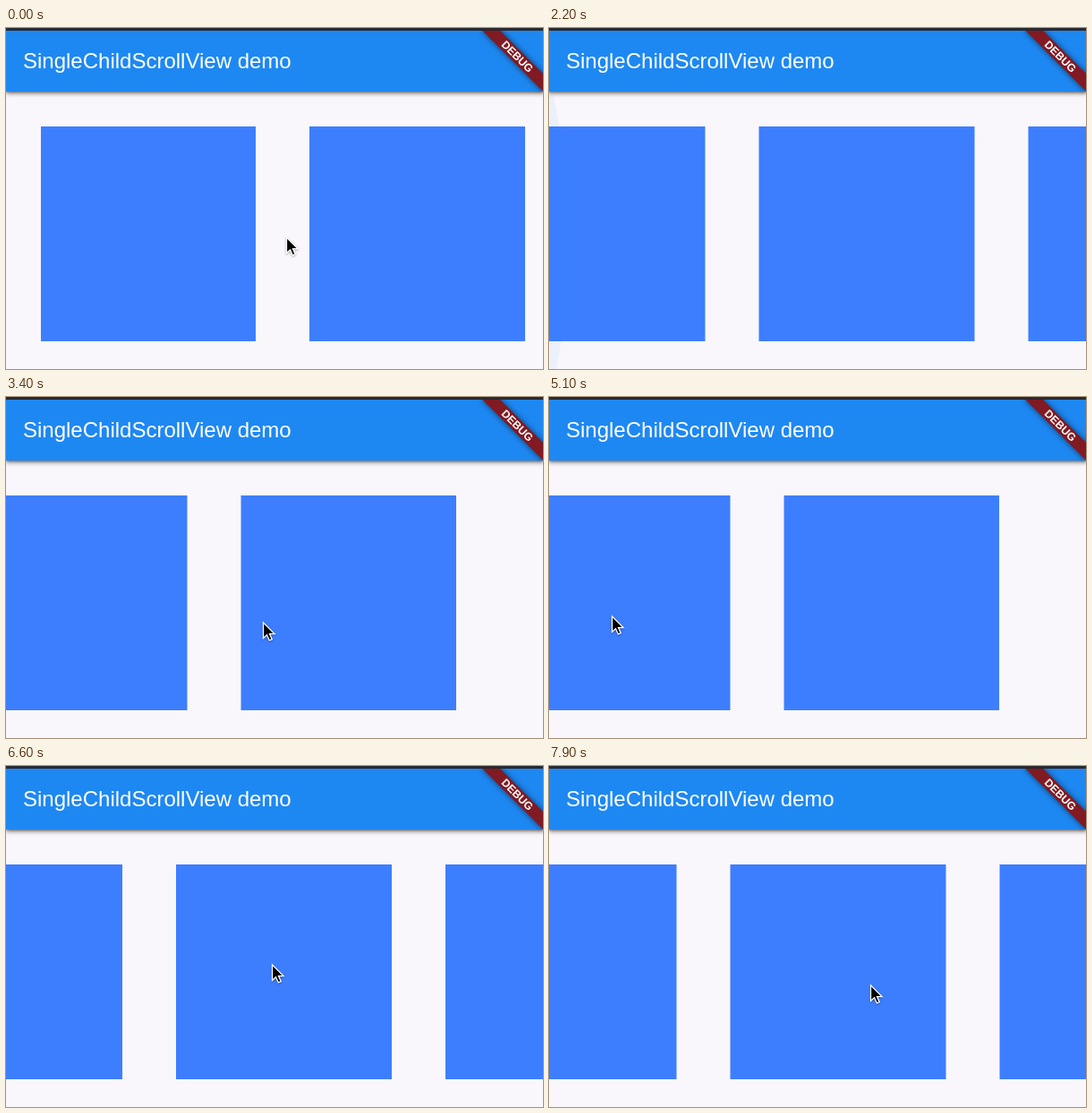
Animation, 600 px wide and 381 px high, one loop 8000 ms. Source, as an HTML page:

```html
<!DOCTYPE html>
<html lang="en">
<head>
<meta charset="utf-8">
<title>SingleChildScrollView demo</title>
<style>
  html, body { margin: 0; width: 100%; height: 100%; overflow: hidden; }
  body { position: relative; background: #f9f7fb; font-family: "Liberation Sans", Arial, sans-serif; }
  div, svg { position: absolute; }

  .stage { width: 600px; height: 381px; overflow: hidden; background: #f9f7fb; }
  .status { width: 600px; height: 3px; background: #2d2c31; }
  .bar {
    top: 3px; width: 600px; height: 68px;
    background: #1e88f2; color: #fff;
    box-shadow: 0 2px 5px rgba(0, 0, 0, .5), 0 1px 2px rgba(0, 0, 0, .25);
  }
  .title { left: 19px; top: 20px; font-size: 24px; line-height: 28px; white-space: nowrap; }

  .view { top: 71px; width: 600px; height: 310px; overflow: hidden; }
  .strip { left: 38.5px; top: 38.5px; display: flex; gap: 60px; }
  .strip i { flex: none; width: 240.5px; height: 240.5px; background: #3d7eff; }
  .glow {
    left: -1434px; top: -552px; width: 1434px; height: 1434px;
    border-radius: 50%; background: rgba(33, 150, 243, .26);
  }

  /* Corner ribbon, rotated about the top right corner of the app */
  .corner { top: 3px; width: 600px; height: 378px; overflow: hidden; }
  .ribbon {
    left: 552px; top: 33.6px; width: 96px; height: 14.4px;
    transform-origin: 48px -33.6px; transform: rotate(45deg);
    background: #811a22; color: #fff;
    box-shadow: 0 0 7px rgba(0, 0, 0, .6);
    font-size: 12.24px; font-weight: 700; line-height: 14.4px; text-align: center;
  }

  .pointer { left: -2px; top: -2px; overflow: visible; filter: drop-shadow(0 1px 1px rgba(0, 0, 0, .35)); }

  .strip, .glow, .pointer { animation: 8s linear infinite; }
  .strip { animation-name: scroll; }
  .glow { animation-name: glow; }
  .pointer { animation-name: point; }

  @keyframes scroll {
    0%, 1.25% { transform: translateX(0); animation-timing-function: ease-in-out; }
    7.5% { transform: translateX(-250px); animation-timing-function: ease-in; }
    12.5%, 15.625% { transform: translateX(0); }
    17.5% { transform: translateX(-73px); }
    27.5% { transform: translateX(-104.5px); animation-timing-function: ease-in-out; }
    36.25%, 67.5% { transform: translateX(-377.5px); animation-timing-function: ease-in-out; }
    82.5% { transform: translateX(-149px); animation-timing-function: ease-in-out; }
    88.75% { transform: translateX(-20px); animation-timing-function: ease-in-out; }
    98.75%, 100% { transform: translateX(-136.5px); }
  }
  @keyframes glow {
    0%, 12.5% { transform: translateX(0); opacity: 0; }
    15.625% { transform: translateX(42px); opacity: 1; }
    17.5% { transform: translateX(38px); opacity: 1; }
    27.5% { transform: translateX(23px); opacity: .25; }
    29%, 100% { transform: translateX(0); opacity: 0; }
  }
  @keyframes point {
    0%, 1.25% { transform: translate(313px, 234px); animation-timing-function: ease-in-out; }
    7.5% { transform: translate(63px, 245px); animation-timing-function: ease-in; }
    12.5% { transform: translate(313px, 250px); }
    15.625% { transform: translate(708px, 250px); }
    17.5% { transform: translate(635px, 250px); }
    27.5% { transform: translate(604px, 250px); animation-timing-function: ease-in-out; }
    36.25% { transform: translate(331px, 252px); }
    42.5% { transform: translate(287px, 252px); animation-timing-function: ease-in-out; }
    55% { transform: translate(6px, 262px); animation-timing-function: ease-in-out; }
    63.75%, 67.5% { transform: translate(70px, 245px); animation-timing-function: ease-in-out; }
    82.5% { transform: translate(297px, 222px); animation-timing-function: ease-in-out; }
    88.75% { transform: translate(426px, 235px); animation-timing-function: ease-in-out; }
    98.75%, 100% { transform: translate(359px, 245px); }
  }
</style>
</head>
<body>
<div class="stage">
  <div class="view">
    <div class="strip"><i></i><i></i><i></i></div>
    <div class="glow"></div>
  </div>
  <div class="status"></div>
  <div class="bar"><div class="title">SingleChildScrollView demo</div></div>
  <div class="corner"><div class="ribbon">DEBUG</div></div>
  <svg class="pointer" width="18" height="26">
    <path d="M2.5 2V19.5L6.5 15.8L9.3 22L12.2 20.7L9.5 14.6H15Z" fill="#000" stroke="#fff" stroke-width="1.3"/>
  </svg>
</div>
</body>
</html>
```
